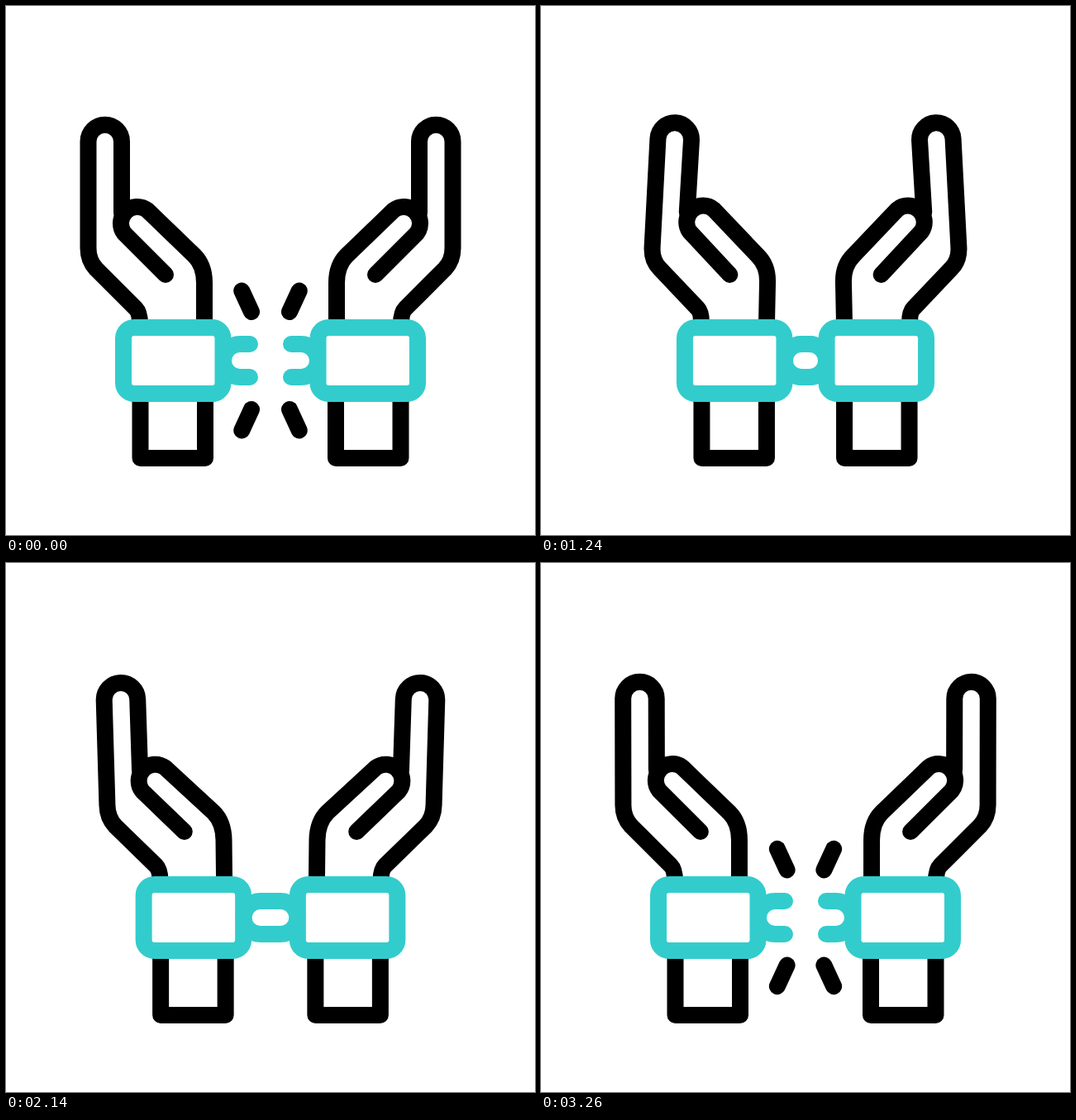
Write an HTML page that moves like this. It is 640x640 px and loops after 3.28 s.

```html
<!DOCTYPE html>
<html lang="en">
<head>
<meta charset="utf-8">
<title>Breaking the cuffs</title>
<style>
  html, body { margin: 0; width: 100%; height: 100%; overflow: hidden; background: #fff; }
  svg { display: block; width: 100%; height: 100%; fill: none; stroke: #000;
        stroke-width: 20; stroke-linecap: round; stroke-linejoin: round; }
  .cuff { stroke: #33cccc; }
</style>
</head>
<body>
<svg viewBox="0 0 640 640">
  <g id="side">
    <g id="arm">
      <path id="finger"/>
      <path id="thumb"/>
      <path d="M162.5 470V547H241V470"/>
      <g class="cuff">
        <rect x="142" y="389" width="120.5" height="80" rx="13" fill="#fff"/>
        <path d="M295 409H283A20 20 0 0 0 283 449H295"/>
      </g>
    </g>
    <path id="spark"/>
  </g>
  <use href="#side" transform="matrix(-1 0 0 1 640 0)"/>
</svg>
<script>
const LOOP = 3280;
const $ = id => document.getElementById(id);

// Keys: [time, value], eased in and out between neighbours.
const shiftKeys = [[0, 0], [500, 0], [700, 32], [1020, 22], [1250, 32], [1515, 20], [1780, 32],
  [2040, 21], [2300, 32], [2700, 24], [2820, 23], [3000, 0], [LOOP, 0]];
const tiltKeys = [[0, 0], [70, .55], [170, 0], [560, 0], [740, .6], [1030, -1], [1250, .7], [1515, -1.2],
  [1780, 1], [2040, -1.05], [2300, 1], [2700, -1], [3040, -1.05], [LOOP, 0]];
const spreadKeys = [[0, 0], [40, 0], [410, 1.65], [665, 0], [LOOP, 0]];
const headKeys = [[3080, -14], [3240, 25], [3280, 28], [3480, 40]];
const tailKeys = [[3080, -14], [3160, -11], [3240, -3], [3280, 0], [3480, 40]];

const smooth = u => u * u * (3 - 2 * u);
const linear = u => u;

function sample(keys, t, ease = smooth) {
  const i = keys.findIndex(k => k[0] > t);
  if (i < 1) return keys[i ? keys.length - 1 : 0][1];
  const [t0, a] = keys[i - 1], [t1, b] = keys[i];
  return a + (b - a) * ease((t - t0) / (t1 - t0));
}

function drawHand(tilt, spread) {
  // A joint at rest, its offset when tilted inward, its offset when spread.
  const p = (x, y, tx = 0, ty = 0, sx = 0, sy = 0) =>
    (x + tx * tilt + sx * spread).toFixed(2) + " " + (y + ty * tilt + sy * spread).toFixed(2);
  $("finger").setAttribute("d",
    `M${p(140, 250, 7, -1, -6, 3)}
     L${p(140, 164, 14.5, -2, -30.5, 5.5)}
     A20 20 0 0 0 ${p(99.5, 164, 14.5, -5, -29.5, 14.5)}
     L${p(99.5, 293, 4.5, 0, 0, 1)}
     Q${p(99.5, 308, 4, 0, 3, 1)} ${p(109, 318, 3.5, -1, 3, 3)}
     L${p(157, 366, 1)}
     Q${p(162, 371, .5)} ${p(162, 385)}`);
  $("thumb").setAttribute("d",
    `M${p(193, 325, 5, 0, -2.5, 1)}
     L${p(143, 275, 7, -3, -2.3, 6.2)}
     A20 20 0 0 1 ${p(171, 247, 9, -1, -4.7, 3.8)}
     L${p(228, 302, 4, 1, -2, -1)}
     Q${p(240, 314, 4, 1, -1, 0)} ${p(240, 335, 3)}
     L${p(240, 385, 1.5)}`);
}

function drawSparks(t) {
  const time = t < 300 ? t + LOOP : t;
  if (time < 3080 || time > 3470) return $("spark").setAttribute("d", "");
  const head = sample(headKeys, time, linear), tail = sample(tailKeys, time, linear);
  const at = (d, flip) => {
    const y = 370 - .91 * d;
    return `${297 - .42 * d} ${flip ? 858 - y : y}`;
  };
  $("spark").setAttribute("d", [false, true].map(f => `M${at(tail, f)}L${at(head, f)}`).join(""));
}

function frame(now) {
  const t = now % LOOP;
  const spread = sample(spreadKeys, t);
  $("arm").setAttribute("transform",
    `translate(${sample(shiftKeys, t)} ${7.7 * spread}) rotate(${-4.2 * spread} 202 459)`);
  drawHand(sample(tiltKeys, t), spread);
  drawSparks(t);
}

let start;
function tick(now) {
  start ??= now;
  frame(now - start);
  requestAnimationFrame(tick);
}
frame(0);
requestAnimationFrame(tick);
</script>
</body>
</html>
```
